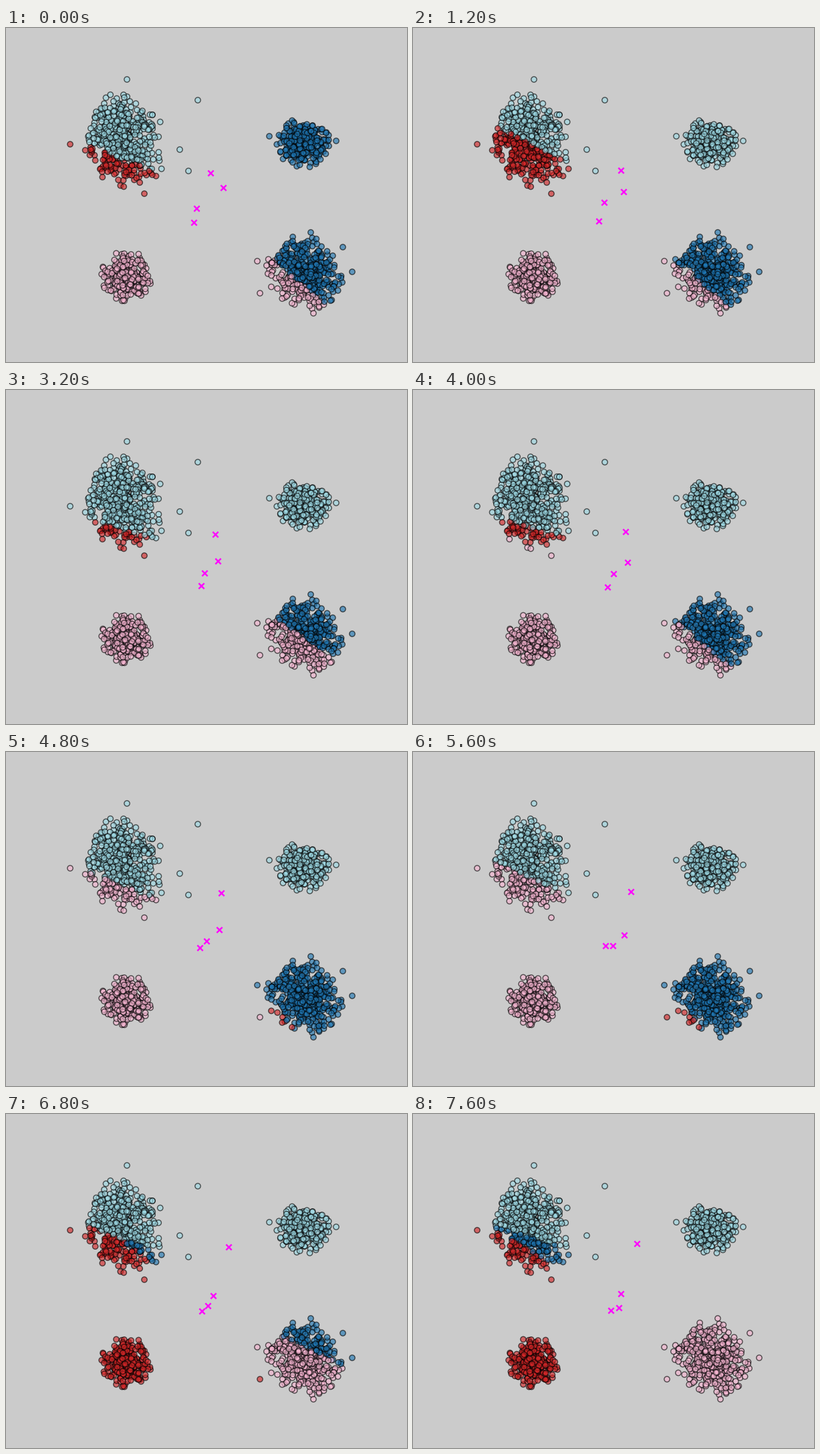
Recreate the animation shown at these times as a matplotlib script. Size 600 px wide and 500 px high, loop 8 s.

```python
import numpy as np
import matplotlib.pyplot as plt
from matplotlib.animation import FuncAnimation

WIDTH, HEIGHT, DPI = 600, 500, 100
FRAMES, INTERVAL = 20, 400
BACKGROUND = "#cbcbcb"

rng = np.random.default_rng(7)


def blob(center, spread, count, tilt=0.0, reach=2.4):
    """Tilted Gaussian cloud without the points beyond `reach` deviations."""
    x, y = rng.normal(size=(2, count * 2))
    near = np.hypot(x, y) < reach
    x, y = x[near][:count], y[near][:count]
    y = tilt * x + np.sqrt(1 - tilt ** 2) * y
    return np.column_stack([x, y]) * spread + center


stragglers = [(181, 77), (287, 108), (96, 174), (260, 182), (273, 214), (207, 248),
              (394, 162), (494, 169), (376, 349), (380, 397), (460, 427),
              (504, 328), (518, 365), (456, 306)]
points = np.vstack([
    blob((178, 168), (27, 30), 510, tilt=0.12),
    blob((445, 173), (18, 16), 305),
    blob((181, 371), (16, 16), 305),
    blob((447, 366), (24, 23), 460, tilt=0.1),
    stragglers,
])
rng.shuffle(points)

# Each centroid drifts between a few key positions.
key_frames = [0, 3, 6, 10, 14, 16, 19]
paths = {
    "blue": [(325, 239), (315, 245), (313, 253), (321, 258), (316, 274), (309, 273), (311, 269)],
    "red": [(285, 270), (286, 261), (293, 273), (300, 275), (299, 290), (291, 295), (296, 294)],
    "pink": [(281, 291), (278, 289), (292, 291), (291, 295), (288, 290), (299, 286), (308, 290)],
    "cyan": [(306, 217), (311, 213), (307, 219), (318, 212), (326, 209), (332, 201), (335, 194)],
}
palette = plt.get_cmap("tab20")(np.linspace(0, 1, len(paths)))
palette[:, 3] = 0.63


def centroids_at(frame):
    return np.array([[np.interp(frame, key_frames, axis) for axis in zip(*path)]
                     for path in paths.values()])


def nearest(centroids):
    gaps = points[:, None, :] - centroids[None, :, :]
    return (gaps ** 2).sum(axis=2).argmin(axis=1)


fig = plt.figure(figsize=(WIDTH / DPI, HEIGHT / DPI), dpi=DPI, facecolor=BACKGROUND)
ax = fig.add_axes([0, 0, 1, 1])
ax.set(xlim=(0, WIDTH), ylim=(HEIGHT, 0))
ax.axis("off")
dots = ax.scatter(*points.T, s=36, linewidths=1, edgecolors=(0, 0, 0, 0.63))
crosses = ax.scatter(*centroids_at(0).T, s=36, marker="x", color="magenta",
                     linewidths=1.7, zorder=3)


def update(frame):
    centroids = centroids_at(frame)
    dots.set_facecolors(palette[nearest(centroids)])
    crosses.set_offsets(centroids)
    return dots, crosses


animation = FuncAnimation(fig, update, frames=FRAMES, interval=INTERVAL,
                          repeat=True, repeat_delay=0)
plt.show()
```
